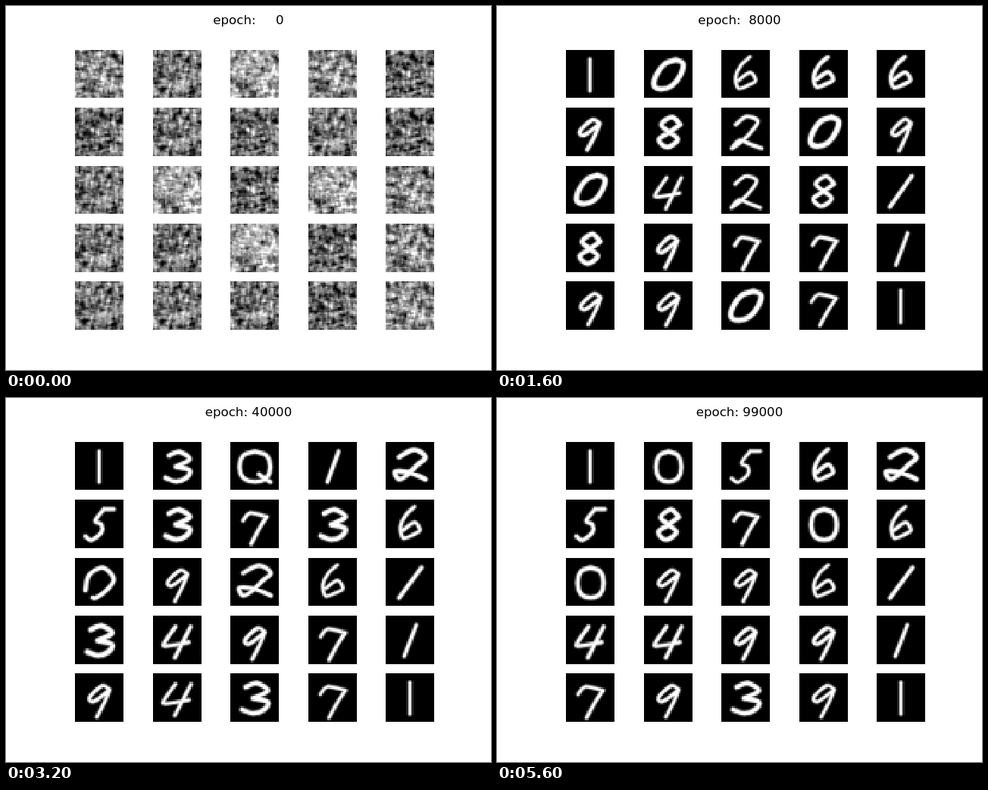
Write an HTML page with a canvas that moves like this. It is 640 px wide and 480 px high and loops after 5800 ms.

```html
<!DOCTYPE html>
<html lang="en">
<head>
<meta charset="utf-8">
<title>Digits by epoch</title>
<style>
html, body { margin: 0; width: 640px; height: 480px; overflow: hidden; background: #fff; }
canvas, svg { position: absolute; left: 0; top: 0; }
text { font: 16.667px "DejaVu Sans", sans-serif; white-space: pre; text-anchor: middle; }
</style>
</head>
<body>
<canvas id="grid" width="640" height="480"></canvas>
<svg width="640" height="480"><text id="title" x="320" y="24" xml:space="preserve"></text></svg>
<script>
const LOOP = 5800, STEP = 200, SIDE = 28, CELL = 64, GLYPH_HEIGHT = 46;

// Pen strokes run through "xy" points on a coarse grid; commas lift the pen.
const RING = '40 71 84 77 48 17 04 11 40';
const GLYPHS = {
  0: { path: RING, wide: 39, pen: 6 },
  O: { path: RING, wide: 44, lean: 0.6, pen: 7 },
  1: { path: '40 48', wide: 6 },
  l: { path: '50 48', wide: 20 },
  '/': { path: '50 48', wide: 34 },
  2: { path: '12 40 71 63 36 08,08 26 57 88', wide: 42 },
  Z: { path: '12 50 82 64 37 18 06 36 67 88', wide: 46, pen: 6, top: 7 },
  3: { path: '11 40 72 34,34 75 67 38 07', wide: 38, pen: 6.5 },
  4: { path: '20 04 15 84,70 64 58', wide: 38, lean: 0.4, top: 12 },
  5: { path: '80 40,40 23 54 66 38 07', wide: 42, lean: 0.5 },
  6: { path: '50 22 05 18 57 76 54 16', wide: 30, top: 7 },
  7: { path: '02 20 81,81 64 48', wide: 36, lean: 0.2, top: 15 },
  8: { path: '72 40 12 44 76 48 16 44 72', wide: 33, lean: 0.2, pen: 6 },
  9: { path: '71 40 03 24 71,71 64 48', wide: 30, lean: 0.25, top: 14 },
  D: { path: '06 12 50 83 66 38 28', wide: 42, pen: 6 },
  Q: { path: RING + ',56 88', wide: 46, pen: 6 }
};

// What each cell shows at the steps where the sheet settles, row by row.
const SHEETS = [
  [6, '1O666 982O9 O428/ 8977l 99O71'],
  [11, '1066Z 58784 09ZO/ 8993l 77371'],
  [16, '13QlZ 53736 D9Z6/ 3497l 94371'],
  [20, '1866Z 58786 0936/ 9499l 79371'],
  [24, '1366Z 53736 0986/ 4499l 77391'],
  [28, '1056Z 58706 0996/ 4499l 79391']
].map(([step, rows]) => ({ step, digits: rows.replace(/ /g, '') }));

// Untrained tiles come in families: dark with a light spot, bright, gray, mottled.
const FAMILIES = 'gdbgm' + 'mdmdm' + 'dbmbg' + 'ddbmg' + 'dddmg';
const MEANS = { d: 108, b: 165, g: 145, m: 105 };

const grid = document.getElementById('grid').getContext('2d');
const title = document.getElementById('title');
const tile = document.createElement('canvas');
tile.width = tile.height = SIDE;
const pen = tile.getContext('2d');
pen.lineCap = pen.lineJoin = 'round';
grid.imageSmoothingEnabled = false;

function seeded(seed) {
  let state = Math.imul(seed + 11, 2654435761) >>> 0;
  return () => {
    state = (Math.imul(state, 1664525) + 1013904223) >>> 0;
    return state / 2 ** 32;
  };
}

// Smooth noise woven from short horizontal and vertical runs, centred on zero.
function weave(seed) {
  const random = seeded(seed), size = SIDE + 4;
  const layer = () => Array.from({ length: size * size }, () => random() - 0.5);
  const across = layer(), down = layer();
  return (x, y) => {
    let sum = 0;
    for (let along = 0; along < 4; along++) {
      for (let side = 0; side < 2; side++) {
        sum += across[(y + side) * size + x + along] + down[(y + along) * size + x + side];
      }
    }
    return sum;
  };
}

function drawGrain(cell) {
  const family = FAMILIES[cell];
  const shared = weave(family.charCodeAt(0)), own = weave(cell);
  for (let y = 0; y < SIDE; y++) {
    for (let x = 0; x < SIDE; x++) {
      const glow = family === 'd' ? 110 * Math.exp(-((x - 19) ** 2 + (y - 17) ** 2) / 14) : 0;
      const level = Math.round(MEANS[family] + glow + 38 * shared(x, y) + 14 * own(x, y));
      pen.fillStyle = `rgb(${level},${level},${level})`;
      pen.fillRect(x, y, 1, 1);
    }
  }
}

// Shears the strokes, then fits them into a box with room for the pen.
function fitStrokes(path, lean, width, { left, top, wide, high }) {
  const strokes = path.split(',').map(stroke =>
    stroke.split(' ').map(([x, y]) => [x - lean * y, +y]));
  const fit = (axis, from, size) => {
    const values = strokes.flat().map(point => point[axis]);
    const low = Math.min(...values), span = Math.max(...values) - low || 1;
    return v => (from + width / 2 + (v - low) / span * Math.max(0, size - width)) * SIDE / CELL;
  };
  const fitX = fit(0, left, wide), fitY = fit(1, top, high);
  return strokes.map(points => points.map(([x, y]) => [fitX(x), fitY(y)]));
}

function smoothPath(points) {
  pen.moveTo(...points[0]);
  for (let i = 0; i + 1 < points.length; i++) {
    const a = points[i], b = points[i + 1];
    const before = points[i - 1] || a, after = points[i + 2] || b;
    pen.bezierCurveTo(
      a[0] + (b[0] - before[0]) / 6, a[1] + (b[1] - before[1]) / 6,
      b[0] - (after[0] - a[0]) / 6, b[1] - (after[1] - a[1]) / 6, b[0], b[1]);
  }
}

// Each cell keeps its own hand; unsettled steps add a wobble.
function drawGlyph(cell, step) {
  const { digit, rough } = digitAt(step, cell);
  const { path, wide, lean = 0, pen: weight = 5, top = 10 } = GLYPHS[digit];
  const hand = seeded(cell), drift = seeded(step * 25 + cell);
  const wobble = () => (drift() - 0.5) * 6 * rough;
  const spread = wide * (0.94 + 0.12 * hand()) + wobble();
  const width = weight - 0.5 + hand();
  const box = {
    left: 32.5 - spread / 2 + wobble(), top: top + wobble(),
    wide: spread, high: GLYPH_HEIGHT + wobble()
  };
  pen.fillStyle = '#000';
  pen.fillRect(0, 0, SIDE, SIDE);
  pen.beginPath();
  fitStrokes(path, lean, width, box).forEach(smoothPath);
  for (const [extra, alpha] of [[0.9, 0.35], [-0.3, 1]]) {
    pen.lineWidth = width * SIDE / CELL + extra;
    pen.strokeStyle = `rgba(255,255,255,${alpha})`;
    pen.stroke();
  }
}

// Between two sheets every cell flips to its next digit at its own moment.
function digitAt(step, cell) {
  const next = SHEETS.findIndex(sheet => sheet.step >= step);
  const to = SHEETS[next], from = SHEETS[next - 1];
  if (!from) return { digit: to.digits[cell], rough: 1 - step / to.step };
  const progress = (step - from.step) / (to.step - from.step);
  const flip = 0.3 + 0.4 * seeded(cell)();
  return {
    digit: (progress < flip ? from : to).digits[cell],
    rough: Math.min(progress, 1 - progress)
  };
}

const epochAt = step => step <= 10 ? step * 1000 : Math.min(99000, (step - 8) * 5000);

function drawStep(step) {
  title.textContent = 'epoch: ' + String(epochAt(step)).padStart(5, '\u00a0');
  grid.fillStyle = '#fff';
  grid.fillRect(0, 0, 640, 480);
  for (let cell = 0; cell < 25; cell++) {
    if (step) drawGlyph(cell, step);
    else drawGrain(cell);
    const x = Math.round(90.9 + 102.62 * (cell % 5));
    const y = 57.6 + 76.47 * Math.floor(cell / 5), top = Math.round(y);
    grid.drawImage(tile, x, top, CELL, Math.round(y + 63.72) - top);
  }
}

const start = performance.now();
let shown = -1;
function tick() {
  const step = Math.floor((performance.now() - start) % LOOP / STEP);
  if (step !== shown) drawStep(shown = step);
  requestAnimationFrame(tick);
}
tick();
</script>
</body>
</html>
```
